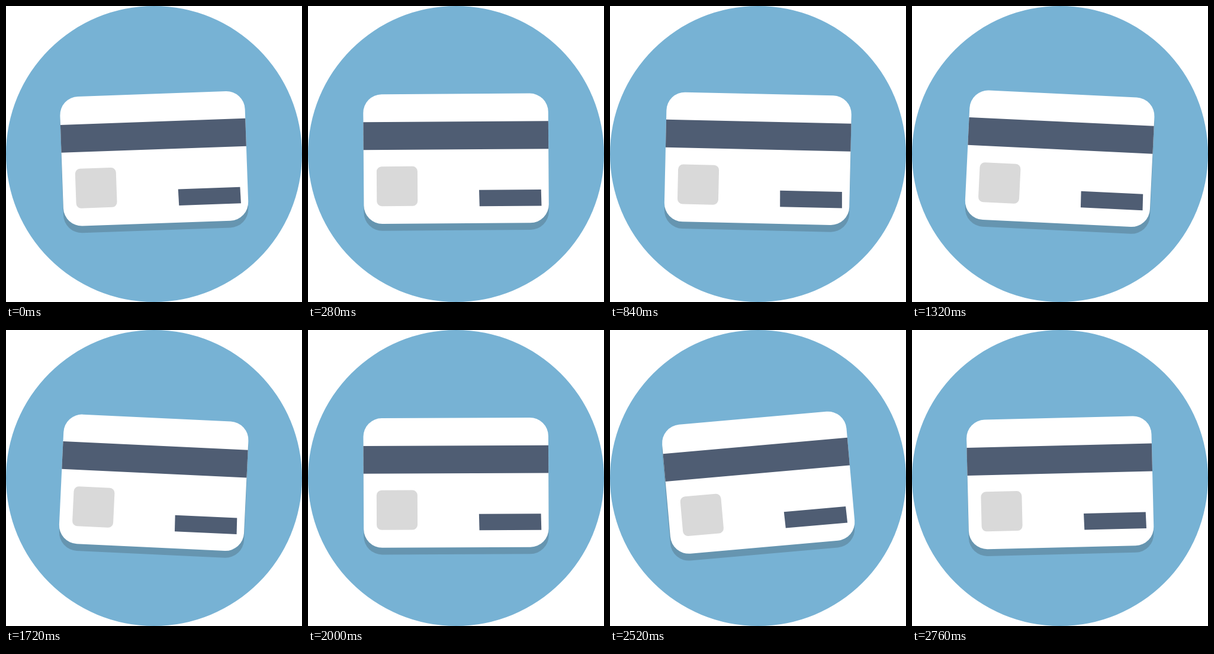
Recreate the animation shown at these times as an HTML page with a canvas. Size 500 by 500 pixels, loop 2800 ms.

```html
<!DOCTYPE html>
<html lang="en">
<head>
<meta charset="utf-8">
<title>Swaying card</title>
<style>
  html, body { margin: 0; width: 100%; height: 100%; overflow: hidden; background: #fff; }
  canvas { display: block; width: 500px; height: 500px; }
</style>
</head>
<body>
<canvas id="stage" width="500" height="500"></canvas>
<script>
const ctx = document.getElementById('stage').getContext('2d');
const LOOP = 2800, STEP = 40;
const UNIT = 500 / 64;

// Tilt in degrees over time in ms
const keys = [
  [0, -2.03], [480, 0.52], [840, 1.28], [1120, 1.85], [1320, 2.74], [1540, 3.5],
  [2000, -0.25], [2240, -4.4], [2400, -5.3], [2520, -5.05], [2760, -1.38]
];

const slope = i => (keys[i + 1][1] - keys[i][1]) / (keys[i + 1][0] - keys[i][0]);

// Tangents that keep the curve from overshooting its keys
const tangents = keys.map((_, i) => {
  if (i === 0) return slope(0);
  if (i === keys.length - 1) return slope(i - 1);
  const a = slope(i - 1), b = slope(i);
  return a * b <= 0 ? 0 : 2 * a * b / (a + b);
});

function tiltAt(time) {
  let i = 0;
  while (i < keys.length - 2 && time > keys[i + 1][0]) i++;
  const [t0, v0] = keys[i], [t1, v1] = keys[i + 1];
  const span = t1 - t0, u = (time - t0) / span, w = 1 - u;
  return v0 * (1 + 2 * u) * w * w + tangents[i] * span * u * w * w +
         v1 * u * u * (3 - 2 * u) - tangents[i + 1] * span * u * u * w;
}

function roundRect(x, y, w, h, r, color) {
  ctx.fillStyle = color;
  ctx.beginPath();
  ctx.roundRect(x, y, w, h, r);
  ctx.fill();
}

function polygon(points, color) {
  ctx.fillStyle = color;
  ctx.beginPath();
  points.forEach(([x, y]) => ctx.lineTo(x, y));
  ctx.fill();
}

function tilted(angle, dy, paint) {
  ctx.save();
  ctx.translate(250, 250 + dy);
  ctx.rotate(angle);
  ctx.translate(-250, -250);
  paint();
  ctx.restore();
}

function cardBody(color) {
  roundRect(12 * UNIT, 19 * UNIT, 40 * UNIT, 28 * UNIT, 4 * UNIT, color);
}

function draw(time) {
  const angle = tiltAt(time) * Math.PI / 180;
  ctx.fillStyle = '#fff';
  ctx.fillRect(0, 0, 500, 500);
  ctx.fillStyle = '#77b2d4';
  ctx.beginPath();
  ctx.arc(250, 250, 250, 0, Math.PI * 2);
  ctx.fill();

  tilted(angle, 1.5 * UNIT, () => cardBody('rgba(35, 31, 32, 0.2)'));
  tilted(angle, 0, () => {
    cardBody('#fff');
    ctx.fillStyle = '#4f5d73';
    ctx.fillRect(12 * UNIT, 25 * UNIT, 40 * UNIT, 6 * UNIT);
    roundRect(115.7, 270.3, 69, 67, 8.5, '#d9d9d9');
    polygon([[288.6, 311], [393.3, 310.9], [393.9, 338.4], [289.2, 338.4]], '#4f5d73');
  });
}

function tick() {
  const time = performance.now() % LOOP;
  draw(Math.floor(time / STEP) * STEP);
  requestAnimationFrame(tick);
}
tick();
</script>
</body>
</html>
```
